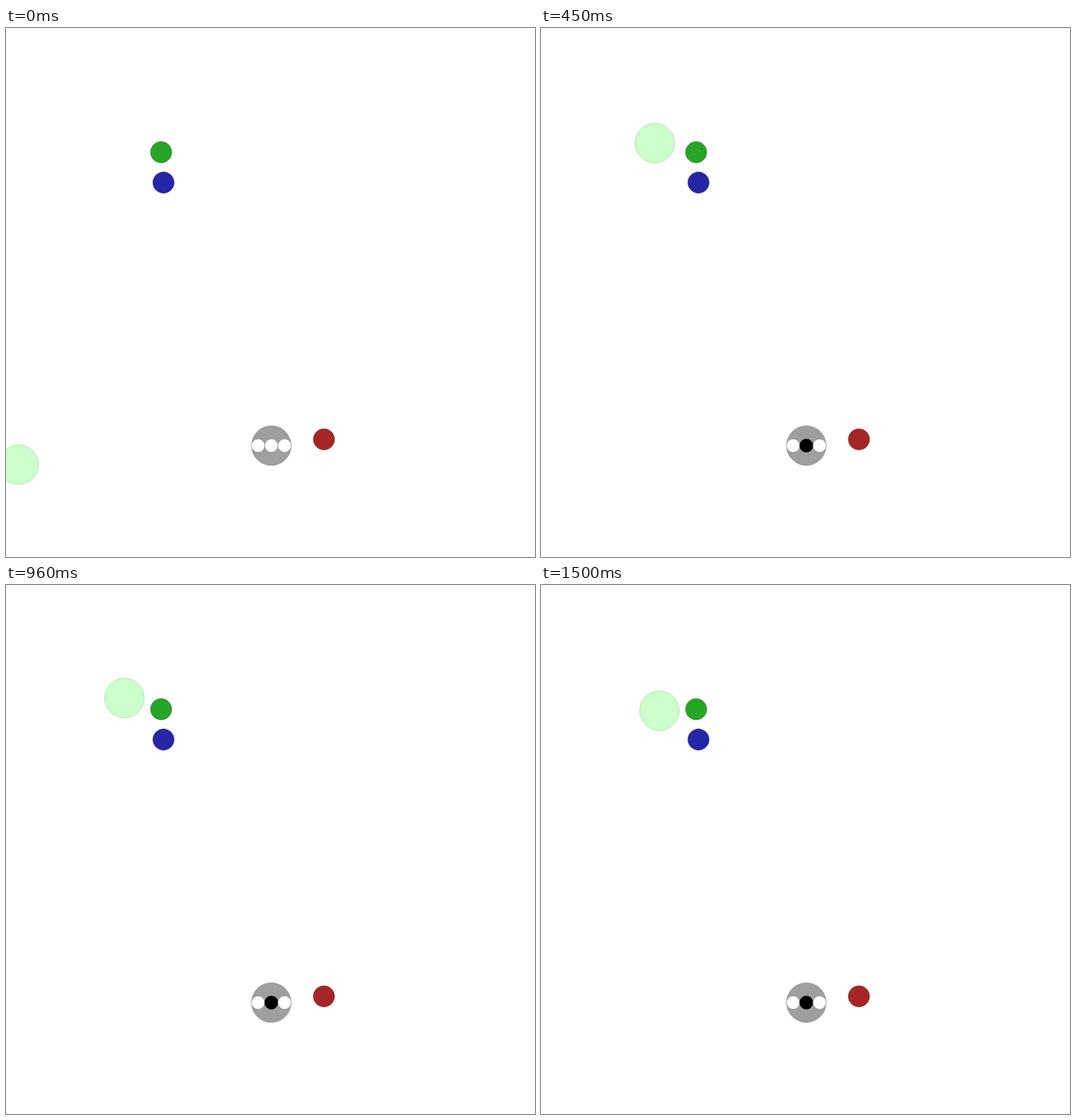
Animation, 700 px wide and 700 px high, one loop 1530 ms. Source, as an HTML page with a canvas:

```html
<!DOCTYPE html>
<html lang="en">
<head>
<meta charset="utf-8">
<title>Particle agents</title>
<style>
  html, body { margin: 0; width: 100%; height: 100%; overflow: hidden; background: #fff; }
  canvas { display: block; width: 700px; height: 700px; }
</style>
</head>
<body>
<canvas id="stage" width="700" height="700"></canvas>
<script>
const ctx = document.getElementById("stage").getContext("2d");

const STEP_MS = 30;
const STEPS = 50;
const IMPULSE = 17.5;
const KEEP = 0.75; // share of velocity kept per step
const SIDES = 30;

const MOVES = { R: [1, 0], U: [0, -1], D: [0, 1] };
const plan = "RUUUUURUUUDDDUU" + "DDUU".repeat(9);

// Damped point mass pushed by one unit impulse per step.
function simulate() {
  let x = 16.75, y = 577.9, vx = 0, vy = 0;
  const path = [[x, y]];
  for (const move of plan.slice(0, STEPS)) {
    const [ax, ay] = MOVES[move];
    vx = vx * KEEP + ax * IMPULSE;
    vy = vy * KEEP + ay * IMPULSE;
    x += vx;
    y += vy;
    path.push([x, y]);
  }
  return path;
}

const rgba = (rgb, alpha) =>
  `rgba(${rgb.map(c => Math.round(c * 255)).join(",")},${alpha})`;

// Filled polygon with an outline at half colour and half opacity.
function disc(x, y, radius, rgb, alpha = 1) {
  ctx.beginPath();
  for (let i = 0; i < SIDES; i++) {
    const angle = 2 * Math.PI * i / SIDES;
    ctx.lineTo(x + radius * Math.cos(angle), y + radius * Math.sin(angle));
  }
  ctx.closePath();
  ctx.fillStyle = rgba(rgb, alpha);
  ctx.fill();
  ctx.strokeStyle = rgba(rgb.map(c => c / 2), alpha / 2);
  ctx.lineWidth = 1;
  ctx.stroke();
}

const path = simulate();
const speaker = { x: 351.1, y: 552.6 };

function draw(step) {
  ctx.fillStyle = "#fff";
  ctx.fillRect(0, 0, 700, 700);

  disc(speaker.x, speaker.y, 26.25, [0.25, 0.25, 0.25], 0.5);
  for (let i = -1; i <= 1; i++) {
    const shade = i === 0 && step > 0 ? 0 : 1;
    disc(speaker.x + i * 17.5, speaker.y, 8.75, [shade, shade, shade]);
  }

  disc(...path[step], 26.25, [0.6, 1, 0.6], 0.5);
  disc(420.7, 544.3, 14, [0.65, 0.15, 0.15]);
  disc(205.3, 164.4, 14, [0.15, 0.65, 0.15]);
  disc(208.4, 204.5, 14, [0.15, 0.15, 0.65]);
}

const start = performance.now();

function tick() {
  const elapsed = performance.now() - start;
  draw(Math.floor(elapsed / STEP_MS) % (STEPS + 1));
  requestAnimationFrame(tick);
}

tick();
</script>
</body>
</html>
```
